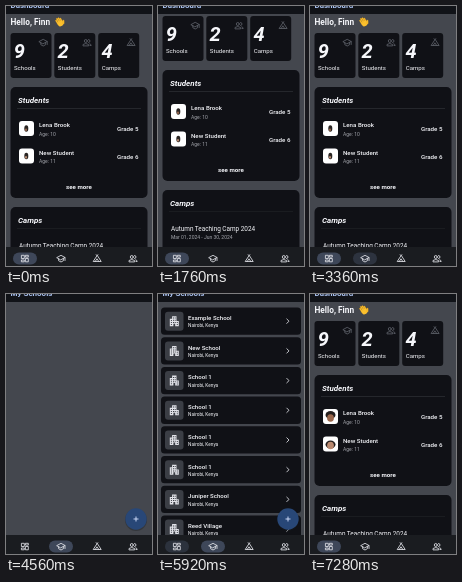
Animation, 146 px wide and 260 px high, one loop 8 s. Source, as an HTML page:

```html
<!DOCTYPE html>
<html lang="en">
<head>
<meta charset="utf-8">
<style>
  html, body { margin: 0; width: 100%; height: 100%; overflow: hidden; background: #44474e; }
  svg { display: block; width: 100%; height: 100%; }
  text { font-family: Roboto, sans-serif; fill: #f6f7fb; }
  .line { fill: none; stroke: currentColor; stroke-width: .85; stroke-linejoin: round; stroke-linecap: round; }
</style>
</head>
<body>
<svg id="stage" viewBox="0 0 146 260">
  <defs>
    <g id="grid" class="line"><path d="M-3.2-3.2h2.5v3.2h-2.5zM.8-3.2h2.5v1.8H.8zM-3.2 1.5h2.5v1.8h-2.5zM.8 0h2.5v3.3H.8z"/></g>
    <g id="school" class="line"><path d="M-4-1 0-3.2 4-1 0 1.2zM-2.4.2v2L0 3.5 2.4 2.2v-2M4-1v3"/></g>
    <g id="tent" class="line"><path d="M0-2.8-3.8 3H3.8zM-.8-3.8 0-2.8.8-3.8M-1.8 3 0 .3 1.8 3"/></g>
    <g id="people" class="line"><circle cx="-1.2" cy="-1.5" r="1.5"/><path d="M-4 3V2q2.8-2 5.6 0v1zM1.5-3a1.5 1.5 0 0 1 0 3M2.7 1.3q1.5.4 1.500 1.700H3"/></g>
    <path id="building" fill="#e1e2e8" fill-rule="evenodd" d="M-4.5 5v-7.5h2.3V-5h4.4v4.8h2.3V5H.9V2.5H-.9V5z
      M-3.4-1.3v1h1v-1zm0 2v1h1v-1zm0 2v1h1v-1zM-1.3-3.7v1h1v-1zm1.7 0v1h1v-1zM-1.3-1.4v1h1v-1zm1.7 0v1h1v-1zM-1.3.7v1h1v-1zm1.7 0v1h1v-1zM2.5.9v1h1v-1zm0 2v1h1v-1z"/>
    <g id="wave" fill="#fbc02d" stroke="#d99718" stroke-width=".25" transform="rotate(-32)">
      <rect x="-3" y="-3.8" width="1.5" height="5.5" rx=".75"/>
      <rect x="-1.4" y="-4.8" width="1.5" height="6" rx=".75"/>
      <rect x=".2" y="-4.4" width="1.5" height="6" rx=".75"/>
      <rect x="1.7" y="-3.2" width="1.3" height="5" rx=".65"/>
      <rect x="-3" y="-.8" width="6" height="5.2" rx="2.4" stroke="none"/>
      <rect x="2.5" y="-.2" width="1.4" height="4" rx=".7" transform="rotate(30 3 2)"/>
    </g>
  </defs>
  <g id="dashboard"></g>
  <g id="schools"></g>
  <rect width="146" height="8" fill="#111318"/>
  <text id="title" x="4.5" y="2" font-size="8" font-weight="700" style="fill:#a9c0ee"></text>
  <g id="fab">
    <circle cx="130" cy="226" r="11" fill="#17191e" opacity=".35"/>
    <circle cx="130" cy="225" r="10.7" fill="#284777"/>
    <path d="M127.500 225h5M130 222.500v5" stroke="#d6e3ff" stroke-width=".9"/>
  </g>
  <rect y="241" width="146" height="19" fill="#1a1c20"/>
  <g id="nav"></g>
</svg>
<script>
const $ = id => document.getElementById(id);
const CARD = '#101116';

const label = (x, y, size, str, attrs = '') =>
  `<text x="${x}" y="${y}" font-size="${size}" ${attrs}>${str}</text>`;
const box = (x, y, w, h, r, fill, attrs = '') =>
  `<rect x="${x}" y="${y}" width="${w}" height="${h}" rx="${r}" fill="${fill}" ${attrs}/>`;
const oval = (x, y, rx, ry, fill) =>
  `<ellipse cx="${x}" cy="${y}" rx="${rx}" ry="${ry}" fill="${fill}"/>`;
const icon = (name, x, y, color) =>
  `<use href="#${name}" transform="translate(${x} ${y})" color="${color}"/>`;

const stat = (x, count, name, glyph) =>
  box(x, 27, 41, 45, 3, CARD) +
  label(x + 3.3, 51.5, 20, count, 'font-weight="700" font-style="italic"') +
  label(x + 3.5, 64, 6.1, name) + icon(glyph, x + 32.7, 36.5, '#5d6068');

const panel = (y, h, name, rule) =>
  box(4.5, y, 137, h, 5, CARD) +
  label(12, y + 15.5, 8, name, 'font-weight="700" font-style="italic"') +
  box(11, y + 21, 124, .5, 0, rule);

const avatar = (y, skin, hairTop) =>
  box(13, y, 15, 15, 3, '#fff') +
  `<g class="early">${oval(20.3, y + 7.5, 2, 3.3, '#2a2523')}${oval(20, y + 8.8, 1, 1.4, skin)}</g>
   <g class="late">${oval(20.5, y + hairTop, 5, 4, '#241f1e')}${oval(20.5, y + 9, 3.4, 3.8, skin)}</g>`;

const student = (y, name, age, grade, skin, hairTop) =>
  avatar(y, skin, hairTop) + label(33, y + 6, 6.15, name, 'font-weight="500"') +
  label(33, y + 14.5, 5, `Age: ${age}`, 'style="fill:#a6a8af"') +
  label(132.5, y + 10, 6.2, `Grade ${grade}`, 'text-anchor="end" font-weight="500"');

$('dashboard').innerHTML =
  label(4.5, 19, 8.3, 'Hello, Finn', 'font-weight="600"') +
  '<use href="#wave" x="53.700" y="16"/>' +
  stat(4.5, 9, 'Schools', 'school') + stat(48.3, 2, 'Students', 'people') + stat(92.2, 4, 'Camps', 'tent') +
  panel(81, 111, 'Students', '#3a3c42') +
  student(115, 'Lena Brook', 10, 5, '#9b684d', 6) +
  student(142.5, 'New Student', 11, 6, '#b98970', 8) +
  label(73, 183, 6.2, 'see more', 'text-anchor="middle" font-weight="600"') +
  panel(201, 100, 'Camps', '#24262b') +
  label(13, 241.5, 6.4, 'Autumn Teaching Camp 2024') +
  label(13, 249.5, 5, 'Mar 01, 2024 - Jun 30, 2024', 'style="fill:#a6a8af"');

const schoolNames = ['Example School', 'New School', 'School 1', 'School 1', 'School 1',
  'School 1', 'Juniper School', 'Reed Village'];
$('schools').innerHTML = '<g id="list">' + schoolNames.map((name, i) => {
  const y = 13.5 + i * 29.7;
  return box(3, y, 140, 27.3, 3.5, CARD) + box(7, y + 4.2, 18.5, 19, 3, '#3b3e45') +
    icon('building', 16.3, y + 13.7) +
    label(30, y + 12.5, 6.1, name, 'font-weight="500"') +
    label(30, y + 19.8, 4.75, 'Nairobi, Kenya') +
    `<path class="line" color="#e1e2e8" d="M128.8 ${y + 11.5}l2.2 2.2-2.2 2.2"/>`;
}).join('') + '</g><circle id="spinner" cx="73" cy="124" r="6" fill="none" stroke="#aac7ff" stroke-width="1.4" stroke-dasharray="12 26"/>';

$('nav').innerHTML =
  box(7, 246.5, 24, 12, 6, '#3e4759', 'id="homePill"') +
  box(43, 246.5, 24, 12, 6, '#3e4759', 'id="schoolPill"') +
  ['grid', 'school', 'tent', 'people'].map((name, i) => icon(name, 19 + i * 36, 252.5, '#e1e2e8')).join('');

// Value of the latest [time, value] step at or before t.
const hold = (steps, t) => steps.reduce((value, [at, next]) => t >= at ? next : value, 0);

const scroll = [[0, 0], [1360, -3], [1440, -7], [1600, -11], [1680, -15], [1760, -17],
  [1920, -9], [2000, -3], [2080, 0]];
const schoolsOn = [[0, 0], [3520, 1], [6640, .6], [6720, .2], [6800, 0]];
const listOn = [[4640, .6], [4720, 1]];
const fabOn = [[3520, .6], [3760, .85], [3840, 1], [6640, .5], [6720, .2], [6800, 0]];
const homeOn = [[0, 1], [4400, .4], [4560, 0], [5840, .3], [5920, .5], [6640, .8], [6800, 1]];
const schoolOn = [[3360, .55], [4400, 1], [6640, .6], [6800, .2], [6960, .1], [7120, 0]];

const fade = (id, steps, t) => $(id).setAttribute('opacity', hold(steps, t));
const show = (el, on) => el.style.display = on ? '' : 'none';

function draw(now) {
  const t = now % 8000;
  const away = hold(schoolsOn, t);
  $('dashboard').setAttribute('transform', `translate(0 ${hold(scroll, t)})`);
  $('dashboard').setAttribute('opacity', 1 - away);
  $('schools').setAttribute('opacity', away);
  $('title').textContent = away > .5 ? 'My Schools' : 'Dashboard';
  fade('list', listOn, t);
  fade('fab', fabOn, t);
  fade('homePill', homeOn, t);
  fade('schoolPill', schoolOn, t);
  show($('spinner'), t >= 4400 && t < 4560);
  document.querySelectorAll('.early').forEach(el => show(el, t < 6640));
  document.querySelectorAll('.late').forEach(el => show(el, t >= 6640));
  requestAnimationFrame(draw);
}
requestAnimationFrame(draw);
</script>
</body>
</html>
```
